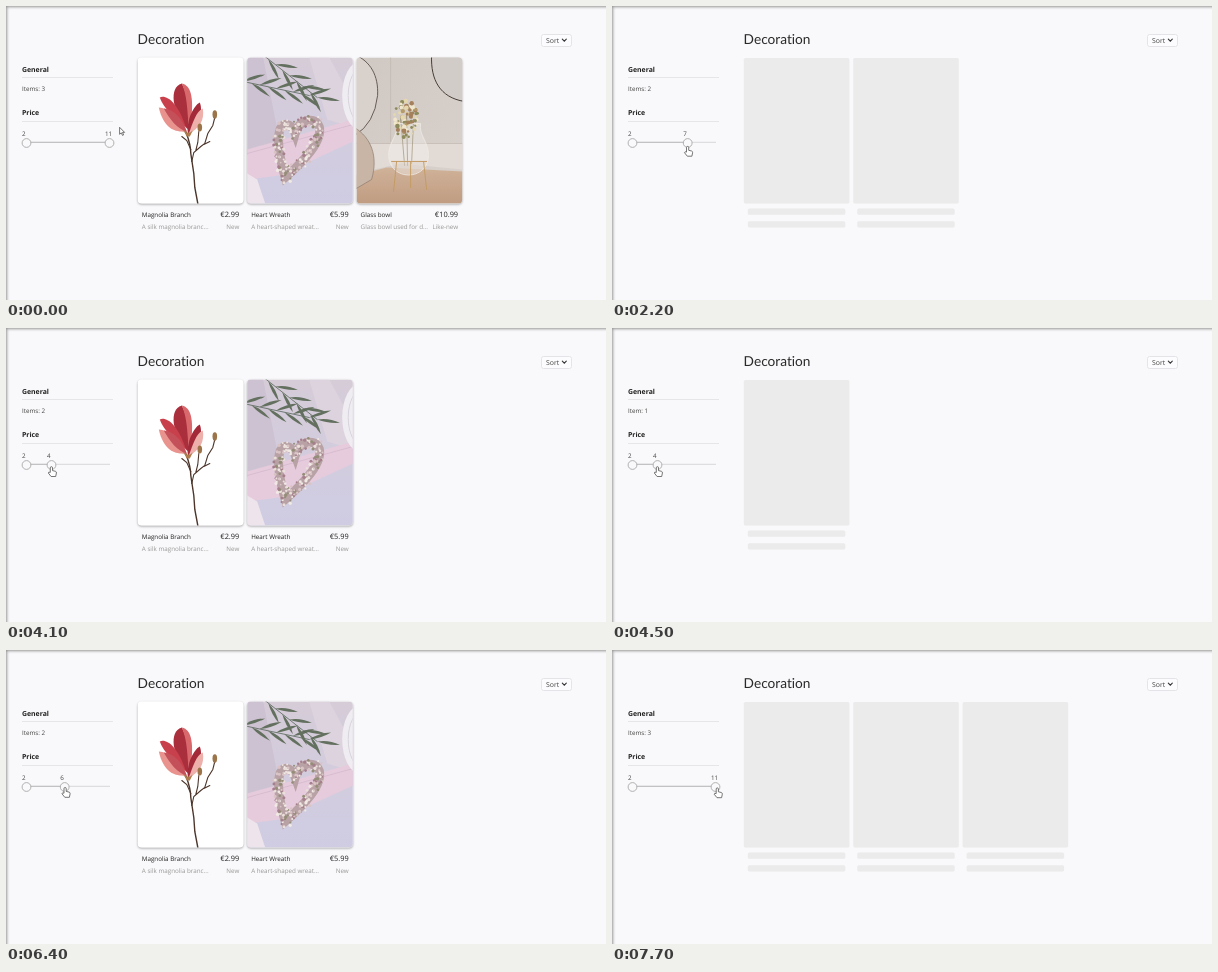
An HTML page that plays this animation: 600x294 px, repeating every 8 s.

```html
<!DOCTYPE html>
<html lang="en">
<head>
<meta charset="utf-8">
<title>Decoration</title>
<style>
  html, body { margin: 0; width: 100%; height: 100%; overflow: hidden; background: #f9f8fa; }
  body::after { content: ""; position: fixed; inset: 0; box-shadow: inset 2px 2px 3px -1px #0006; }
  svg { display: block; width: 100%; height: 100%; }
  text { font: 6.25px "Open Sans", "Noto Sans", sans-serif; fill: #444; text-rendering: geometricPrecision; }
  .title { font: 13.7px Lato, sans-serif; font-variant-ligatures: none; fill: #2a2a2a; }
  .head { font-size: 6.9px; font-weight: 700; fill: #222; }
  .price { font-size: 7.4px; fill: #222; }
  .name { fill: #222; }
  .muted { fill: #999; }
  .end { text-anchor: end; }
  .rule { stroke: #e6e5e8; }
  .line { fill: none; stroke-linecap: round; }
  .thumb { fill: #f9f8fa; stroke: #aaa; stroke-width: .9; }
  .frame { fill: #fff; filter: drop-shadow(0 1px 1.2px #0005); }
  .skeleton { fill: #ebebec; }
  #cursor path { stroke: #555; stroke-width: .8; fill: #fff; stroke-linejoin: round; }
</style>
</head>
<body>
<svg viewBox="0 0 600 294">
  <defs>
    <clipPath id="rounded"><rect width="105.6" height="146" rx="4"/></clipPath>
    <linearGradient id="cloth" x2="0" y2="1">
      <stop stop-color="#d6ccd8"/><stop offset="1" stop-color="#cfcce3"/>
    </linearGradient>
    <linearGradient id="wall" x2="1" y2="1">
      <stop stop-color="#d0c8c2"/><stop offset="1" stop-color="#d9d1cb"/>
    </linearGradient>
    <linearGradient id="floor" x2="0" y2="1">
      <stop stop-color="#d0b299"/><stop offset="1" stop-color="#bf9c82"/>
    </linearGradient>

    <g id="magnolia">
      <rect width="106" height="146" fill="#fff"/>
      <g class="line" stroke="#4c352b">
        <path d="M48 74C51 82 53 88 53 96L56 116L57 130L60 146" stroke-width="1.4"/>
        <path d="M54 104L56 95L63 89L67 86L70 76L75 68L77 60M58 93L60 85L61 74M44 79L49 83L53 92M66 87L72 84" stroke-width="1.1"/>
      </g>
      <path d="M36 44C35 35 37 28 44 26C48 34 53 46 50 72C44 66 38 56 36 44Z" fill="#a92f3c"/>
      <path d="M44 26C54 28 57 42 52 72C49 62 51 42 44 26Z" fill="#d9686c"/>
      <path d="M48 70C38 62 25 50 22 40C28 37 40 44 48 70Z" fill="#c8404b"/>
      <path d="M49 74C38 75 26 72 21 50C30 50 42 58 49 74Z" fill="#e9938f"/>
      <path d="M49 74C40 72 32 62 26 51C36 52 44 60 49 74Z" fill="#c4505a"/>
      <path d="M50 75C49 62 56 48 62 45C65 52 63 68 50 76Z" fill="#a32b39"/>
      <path d="M51 76C55 66 58 54 65 51C67 62 62 71 51 76Z" fill="#edb0aa"/>
      <path d="M45 72Q50 78 55 73L52 79H49Z" fill="#ad7a4b"/>
      <g fill="#9c7449"><ellipse cx="62" cy="70" rx="2.3" ry="4"/><ellipse cx="77" cy="57" rx="2.3" ry="4.2"/></g>
    </g>

    <g id="wreath">
      <rect width="106" height="146" fill="url(#cloth)"/>
      <path d="M0 0H16L34 92L0 98Z" fill="#cdc2d2"/>
      <path d="M62 0H82L106 44V70L80 62Z" fill="#ddd3de"/>
      <path d="M0 92L106 62V84L32 118L0 122Z" fill="#e5cbdc"/>
      <path d="M0 96L106 67" stroke="#d5b9cd" stroke-width=".8"/>
      <path d="M0 116L10 122L18 146H0Z" fill="#eee4ec"/>
      <ellipse cx="113" cy="38" rx="18" ry="34" fill="#efedf2"/>
      <ellipse cx="115" cy="38" rx="14" ry="28" class="line" stroke="#d8d3dc"/>
      <g id="leaves" fill="#64705f"/>
      <path id="heart" class="line" stroke="#b8a2a6" stroke-width="9" d="M38 120C34 106 30 86 32 75C34 63 44 65 48 76C52 62 67 58 72 69C76 84 56 104 38 120Z"/>
      <g id="petals"/>
    </g>

    <g id="bowl">
      <rect width="106" height="146" fill="url(#wall)"/>
      <path d="M0 86H106V112L44 106L0 116Z" fill="#e2dbd5"/>
      <path d="M0 118L30 110L106 114V146H0Z" fill="url(#floor)"/>
      <path d="M0 86H106M34 0V84" class="line" stroke="#c2b8b0" stroke-width=".7"/>
      <path d="M-2 -3C14 4 22 18 21 38Q18 66 -2 78Z" fill="#d9d2cc" stroke="#5a4f48" stroke-width=".9"/>
      <path d="M-2 70C14 80 22 98 15 122L-2 132Z" fill="#c8b5a6" stroke="#8b7b6f" stroke-width=".7"/>
      <path d="M75 -2C74 22 83 40 108 44V-2Z" fill="#d2ccc8" stroke="#463d37" stroke-width="1"/>
      <path d="M48 108L44 60M51 108L50 55M55 106L57 62" class="line" stroke="#8a7a5c" stroke-width=".8"/>
      <path d="M40 66C42 78 32 84 32 98C33 124 71 124 72 98C72 84 62 78 64 66Z" fill="#fff4" stroke="#f0eae5" stroke-width=".8"/>
      <path d="M34 103C40 121 65 121 71 103Z" fill="#ddcfc577"/>
      <path d="M35 104H70M40 104L37 134M67 104L70 132M54 104V130" class="line" stroke="#c39a60" stroke-width=".9"/>
      <g id="blooms"/>
    </g>
  </defs>

  <text class="title" x="131.6" y="38">Decoration</text>
  <rect x="535.5" y="28.5" width="30" height="12" rx="2" fill="#fcfbfd" stroke="#e2e1e5" stroke-width=".9"/>
  <text x="540" y="36.7" style="font-size:6.9px">Sort</text>
  <path class="line" d="M556.3 33.2l2 2 2-2" stroke="#333" stroke-width="1.1"/>

  <text class="head" x="16" y="65.5">General</text>
  <path class="rule" d="M16 71.5H107M16 115.5H107"/>
  <text id="count" x="16" y="85.1"></text>
  <text class="head" x="16" y="108.7">Price</text>

  <text x="16" y="129.9">2</text>
  <text id="value" y="129.9"></text>
  <path d="M20 136.3H104" stroke="#d4d3d6" stroke-width=".9"/>
  <path id="range" stroke="#b8b8ba" stroke-width=".9"/>
  <circle class="thumb" cx="20.5" cy="137" r="4.4"/>
  <circle class="thumb" id="thumb" cy="137" r="4.4"/>

  <g id="cards"></g>

  <g id="cursor">
    <path id="arrow" d="M0 0V7L1.7 5.5 2.9 8.1 4 7.6 2.9 5.1H5Z"/>
    <path id="hand" d="M-1.5 5.6V1a1.1 1.1 0 0 1 2.2 0V3.8L3.6 4.5Q4.8 4.9 4.6 6.2L3.9 9.7H-.7L-3.5 6.2Q-3.4 4.7-1.5 5.6Z"/>
  </g>
</svg>

<script>
const LOOP = 8000, STEP = 100;
const MIN_X = 20.5, MAX_X = 103.5;
const el = id => document.getElementById(id);

const products = [
  ["magnolia", "Magnolia Branch", "€2.99", "A silk magnolia branc...", "New"],
  ["wreath", "Heart Wreath", "€5.99", "A heart-shaped wreat...", "New"],
  ["bowl", "Glass bowl", "€10.99", "Glass bowl used for d...", "Like-new"],
];

// start, item count, opacity of the loaded photos (0 = placeholders)
const phases = [
  [0, 3, 1], [2200, 2, 0], [2400, 2, .4], [2500, 2, .8], [2600, 2, 1],
  [4500, 1, 0], [4800, 1, .5], [4900, 1, 1], [6100, 2, 0], [6400, 2, 1], [7700, 3, 0],
];
// time, x
const thumbKeys = [
  [800, 103.5], [1300, 90], [1800, 75.7], [3000, 75.7], [3500, 59], [3900, 46.5], [4100, 45.5],
  [5400, 45.5], [5500, 49.7], [5800, 58.7], [6400, 58.7], [7200, 100], [7300, MAX_X],
];
// time, x, y
const cursorKeys = [
  [0, 113.6, 121.3], [700, 103.8, 140.5], [800, 103.8, 140.5], [1300, 90.5, 140.5], [1700, 76, 140.5],
  [3000, 76, 140.5], [3500, 59, 140], [3900, 46.6, 139], [4100, 45.8, 138.8], [5400, 45.8, 138.8],
  [5500, 52.7, 137.6], [5800, 59.5, 137.6], [6400, 59.5, 137.6], [7200, 104, 138], [7300, 105.7, 138],
];

function seeded(seed) {
  return () => (seed = seed * 16807 % 2147483647) / 2147483647;
}

function sample(keys, t) {
  const next = keys.findIndex(key => key[0] > t);
  if (next === 0) return keys[0].slice(1);
  if (next < 0) return keys.at(-1).slice(1);
  const a = keys[next - 1], b = keys[next];
  const k = (t - a[0]) / (b[0] - a[0]);
  return a.slice(1).map((v, i) => v + (b[i + 1] - v) * k);
}

function pick(list, r) {
  return list[Math.floor(r * list.length)];
}

function dot(x, y, r, fill) {
  return `<circle cx="${x.toFixed(1)}" cy="${y.toFixed(1)}" r="${r.toFixed(1)}" fill="${fill}"/>`;
}

function drawLeaves() {
  let out = "";
  for (const [x, y, dx, dy] of [[-4, 24, 66, 14], [14, -4, 56, 44]]) {
    out += `<path class="line" d="M${x} ${y}l${dx} ${dy}" stroke="#56655a" stroke-width=".8"/>`;
    const tilt = Math.atan2(dy, dx) * 180 / Math.PI;
    for (let i = 0; i < 9; i++) {
      const k = i / 8, angle = tilt + (i % 2 ? 24 : -30);
      out += `<path d="M0 0Q11-3.6 23 0Q11 2.6 0 0Z" transform="translate(${x + dx * k} ${y + dy * k}) rotate(${angle})"/>`;
    }
  }
  el("leaves").innerHTML = out;
}

function drawPetals() {
  const rand = seeded(41), heart = el("heart"), length = heart.getTotalLength();
  let out = "";
  for (let i = 0; i < 170; i++) {
    const p = heart.getPointAtLength(i / 170 * length);
    const color = pick(["#eadfda", "#d9c3c4", "#a57f8c", "#948d78", "#f1e9e4"], rand());
    out += dot(p.x + (rand() - .5) * 11, p.y + (rand() - .5) * 11, .9 + rand() * .8, color);
  }
  el("petals").innerHTML = out;
}

function drawBlooms() {
  const rand = seeded(97);
  let out = "";
  for (let i = 0; i < 75; i++) {
    const a = rand() * 2 * Math.PI, d = Math.sqrt(rand());
    const color = pick(["#e5d8ae", "#f0e6cc", "#b49b69", "#a4805d", "#8d8a5b"], rand());
    out += dot(49 + Math.cos(a) * d * 13, 62 + Math.sin(a) * d * 19, 1 + rand() * 1.4, color);
  }
  el("blooms").innerHTML = out;
}

function cardMarkup([photo, name, price, about, state], i) {
  return `<g transform="translate(${131.8 + 109.4 * i} 51.5)">
    <g class="skeleton">
      <rect y=".5" width="105.6" height="145.5" rx="1.5"/>
      <rect x="4" y="151" width="97.5" height="6.3" rx="1.5"/>
      <rect x="4" y="163.8" width="97.5" height="6.3" rx="1.5"/>
    </g>
    <g class="loaded">
      <rect class="frame" width="105.6" height="146" rx="4"/>
      <g clip-path="url(#rounded)"><use href="#${photo}"/></g>
      <text class="name" x="4" y="159">${name}</text>
      <text class="price end" x="101.5" y="159.6">${price}</text>
      <text class="muted" x="4" y="171.8">${about}</text>
      <text class="muted end" x="101.5" y="171.8">${state}</text>
    </g>
  </g>`;
}

function render(t) {
  const [, items, opacity] = phases.findLast(phase => phase[0] <= t);
  el("count").textContent = `${items > 1 ? "Items" : "Item"}: ${items}`;
  [...el("cards").children].forEach((card, i) => {
    const [skeleton, loaded] = card.children;
    card.style.display = i < items ? "" : "none";
    skeleton.style.display = opacity ? "none" : "";
    loaded.style.opacity = opacity;
  });

  const [x] = sample(thumbKeys, t);
  el("thumb").setAttribute("cx", x);
  el("range").setAttribute("d", `M20.5 136.3H${x}`);
  el("value").setAttribute("x", x - 4.5);
  el("value").textContent = Math.floor(2 + 9 * (x - MIN_X) / (MAX_X - MIN_X));

  const [cx, cy] = sample(cursorKeys, t);
  const pointing = t >= 500;
  el("cursor").setAttribute("transform", `translate(${cx} ${cy})`);
  el("arrow").style.display = pointing ? "none" : "";
  el("hand").style.display = pointing ? "" : "none";
}

function tick() {
  const t = performance.now() % LOOP;
  render(Math.floor(t / STEP) * STEP);
  requestAnimationFrame(tick);
}

drawLeaves();
drawPetals();
drawBlooms();
el("cards").innerHTML = products.map(cardMarkup).join("");
tick();
</script>
</body>
</html>
```
